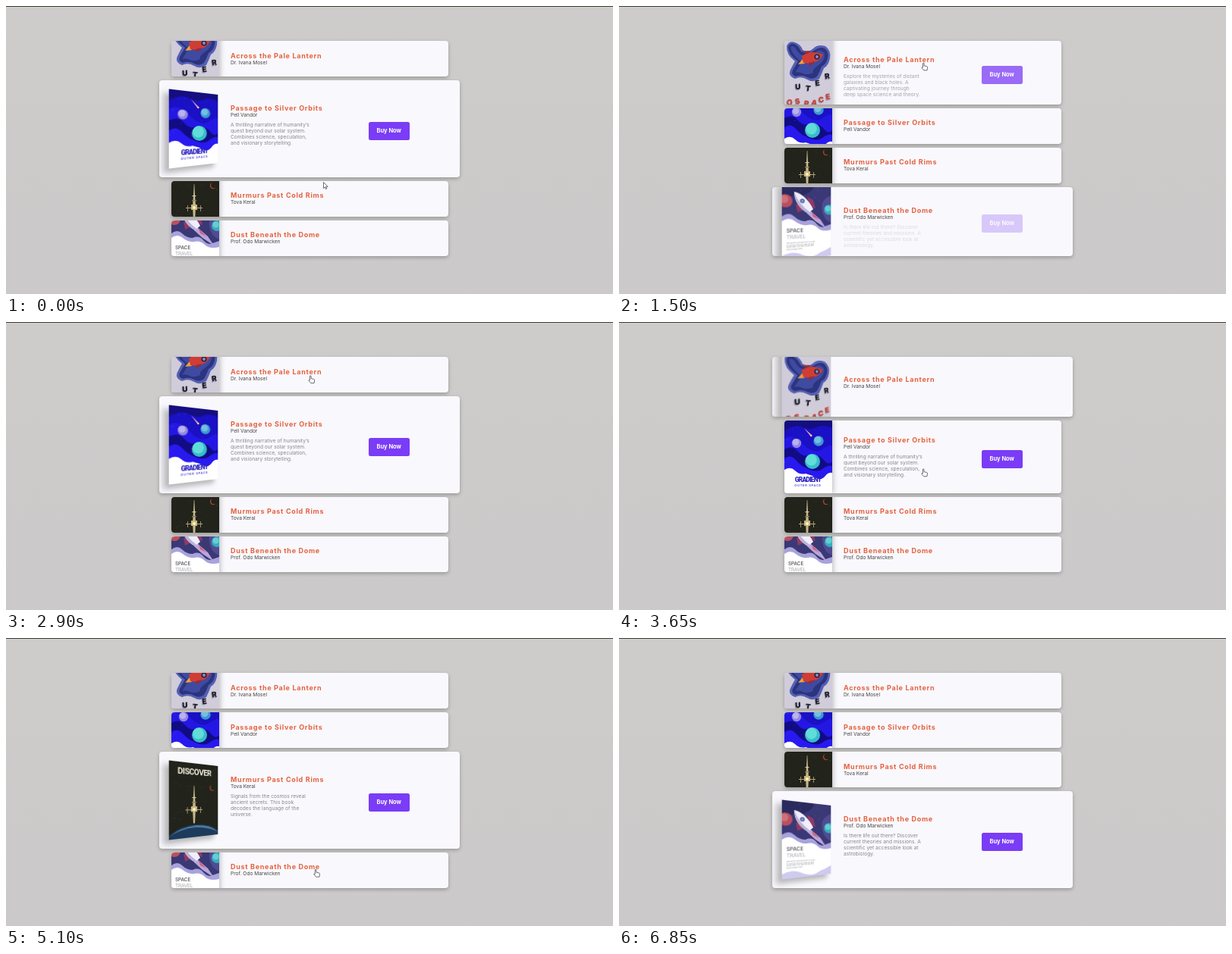
Write an HTML page that moves like this. It is 800 by 380 pixels and loops after 6.9 s.

```html
<!DOCTYPE html>
<html lang="en">
<head>
<meta charset="utf-8">
<title>Book accordion</title>
<style>
  html, body { margin: 0; width: 100%; height: 100%; overflow: hidden; }
  body { position: relative; background: linear-gradient(#cecccb, #cbc9c9); font-family: Inter, "Open Sans", sans-serif; }
  body::before { content: ""; position: absolute; inset: 0 0 auto; height: 1px; background: #3f3d30; }

  .card {
    --open: 0; --pop: 0; --tilt: 0; --sx: 1;
    position: absolute; overflow: hidden;
    left: calc(218px - 16px * var(--pop));
    width: calc(364.5px + 31.5px * var(--pop));
    border-radius: 4px; background: #f9f8fc;
    box-shadow: 0 2px 5px rgba(0, 0, 0, .25);
  }
  .body { position: absolute; top: 50%; left: calc(16px * var(--pop)); }
  .cover {
    position: absolute; left: 0; top: -48px; width: 63px; height: 96px;
    transform: perspective(120px) rotateY(calc(16deg * var(--tilt))) scale(var(--sx), calc(1 + .01 * var(--tilt)));
    box-shadow: calc(1px - 7px * var(--tilt)) calc(5px * var(--tilt)) 7px rgba(0, 0, 0, .27);
  }
  .cover svg { display: block; width: 63px; height: 96px; }
  .text {
    position: absolute; left: 78px; white-space: nowrap;
    top: calc(-4px - 18px * var(--open) - 5.5px * var(--pop));
  }
  .text > * { position: absolute; left: 0; margin: 0; }
  h2 { top: -6px; font: 700 9px/12px Inter, sans-serif; letter-spacing: .7px; color: #e4623f; }
  .author { top: 5px; font-size: 6.6px; line-height: 8px; color: #444; }
  .blurb { top: 18px; font-size: 6.6px; line-height: 8px; letter-spacing: .04px; color: #878589; white-space: pre; opacity: var(--open); }
  .buy {
    position: absolute; left: 260px; top: -9px; width: 53.5px; height: 24px;
    border-radius: 2.5px; background: #7a3cf6; color: #fff; opacity: var(--open);
    font-size: 7.5px; font-weight: 700; line-height: 24px; text-align: center; white-space: nowrap;
  }
  #cursor { position: absolute; left: 0; top: 0; width: 12px; height: 14px; overflow: visible; }
  #cursor path { fill: #fff; stroke: #333; stroke-width: .7; stroke-linejoin: round; }
</style>
</head>
<body>
<svg id="cursor" viewBox="0 0 12 14">
  <path id="arrow" d="M.5 .5V8.6L2.4 6.9 3.6 9.6 4.8 9 3.6 6.4H6.2Z"/>
  <path id="hand" d="M2.4 .8Q3.3 0 4 .9V4.2L7.5 5Q8.6 5.3 8.5 6.5L7.9 10.2H3.6L.8 6.8Q.7 5.6 2.4 6.4Z"/>
</svg>
<script>
const label = (x, y, size, fill, text, extra = "") =>
  `<text x="${x}" y="${y}" font-size="${size}" fill="${fill}" ${extra}>${text}</text>`;
const disc = (x, y, r, fill) => `<circle cx="${x}" cy="${y}" r="${r}" fill="${fill}"/>`;
const shape = (d, fill) => `<path d="${d}" fill="${fill}"/>`;
const rect = (x, y, w, h, fill) => `<rect x="${x}" y="${y}" width="${w}" height="${h}" fill="${fill}"/>`;

// Small repeatable scatter of dots
function dots(count, seed, height, fill) {
  let out = "";
  for (let i = 0; i < count; i++) {
    seed = (seed * 16807) % 2147483647;
    out += disc(seed % 63, (seed >> 8) % height, .3, fill);
  }
  return out;
}

// Letters as [glyph, x, baseline, turn]
const scattered = (list, fill) => list.map(([c, x, y, turn]) => {
  const style = `text-anchor="middle" font-weight="900" transform="rotate(${turn} ${x} ${y})"`;
  return label(x - 1, y + 1.2, 10, "#9a95a8", c, style) + label(x, y, 10, fill, c, style);
}).join("");

function papercutCover() {
  return rect(0, 0, 63, 96, "#d0ccd9") +
    shape("M3 13Q6 5 14 8T24 18Q32 22 38 16T54 13Q62 19 60 29T52 42Q49 50 46 56 38 62 30 57T14 56Q4 52 8 44T14 33Q2 24 3 13Z", "#5560b4") +
    shape("M5 14Q8 8 13 10T22 20Q31 25 39 19T53 16Q59 21 57 29T49 40Q46 48 43 53 37 58 30 54T15 53Q8 50 11 45T18 33Q5 24 5 14Z", "#2b347c") +
    shape("M8 14Q12 11 16 18T26 25Q38 24 42 20T53 22Q54 32 45 38T38 48Q30 52 24 49T14 48Q18 42 23 34 9 24 8 14Z", "#3f4aa2") +
    shape("M18 37L24 30 27 36Z", "#f0a03c") +
    shape("M23 26Q36 17 51 24 48 33 34 36L25 35Z", "#cf3d35") +
    shape("M29 23L23 20 36 19ZM32 35L32 40 41 33Z", "#972c36") +
    disc(43, 27, 3.6, "#23264a") + disc(43, 27, 1.9, "#8b93c8") +
    scattered([["U", 18, 70, -4], ["T", 31, 72, 6], ["E", 44, 65, -8], ["R", 57, 56, -10]], "#20202e") +
    scattered([["O", 7, 91, 0], ["S", 18, 89, -12], ["P", 29, 92, 5], ["A", 39, 91, 8], ["C", 49, 87, -8], ["E", 58, 83, -10]], "#c9473f");
}

function wavesCover() {
  return rect(0, 0, 63, 96, "#1a10c4") +
    shape("M0 0H63V10Q52 4 42 9T22 8Q10 5 0 15Z", "#150e80") +
    shape("M0 24Q8 18 16 24T30 36Q42 44 50 38T63 34V80H0Z", "#2417e4") +
    shape("M0 38Q10 32 17 40T30 46Q46 44 52 52T63 54V80H0Z", "#110c84") +
    shape("M0 50Q8 44 15 52T28 62Q42 70 50 64T63 60V86H0Z", "#2819f0") +
    dots(18, 71, 60, "#b6b4ff") +
    shape("M26 10L36 19 34.5 21Z", "#d59ac4") + disc(35.3, 20, 1.2, "#ffd86b") +
    disc(16, 30, 6.2, "#9288dc") + disc(15, 28.5, 4.2, "#b9b2ee") +
    disc(45, 27, 6.7, "#3f98d0") + disc(44, 25.5, 4.5, "#72bfe2") +
    disc(37, 54, 10, "#37bccb") + disc(35.5, 52, 7.4, "#62dcd8") +
    shape("M0 65Q8 60 14 66T28 70Q36 72 42 76T54 73Q58 68 63 69V96H0Z", "#fff") +
    label(31, 81.4, 8.4, "#2a20c4", "GRADIENT", 'text-anchor="middle" font-weight="800" letter-spacing="-.75" font-family="Roboto, sans-serif"') +
    label(31, 87, 4, "#2a20c4", "OUTER SPACE", 'text-anchor="middle" font-weight="500" letter-spacing=".7"');
}

function stationCover() {
  return rect(0, 0, 63, 96, "#22231b") + dots(34, 913, 74, "#8a886c") +
    label(31.5, 15.2, 10, "#f4f0dc", "DISCOVER", 'text-anchor="middle" font-weight="700" letter-spacing="-.5" font-family="Roboto, sans-serif"') +
    disc(55, 31, 4.2, "#a8452f") + disc(56.2, 30.2, 4, "#22231b") +
    shape("M-4 96Q8 80 32 80T68 96Z", "#1d3a5c") +
    shape("M0 92Q14 81.5 32 81T63 92Q48 84 32 83.5T0 92Z", "#4f7f9f") +
    shape("M29.7 29H30.3L31 44 32 58 31 78H29L28 58 29 44Z", "#c4b88c") +
    rect(27.5, 44, 5, 1.2, "#d8cc9c") + rect(27, 50, 6, 1.2, "#8a7b55") +
    rect(19, 60, 22, 1, "#b9a877") + rect(26, 56, 8, 7, "#c9b680") +
    rect(21, 57, .9, 8, "#a79c74") + rect(38, 57, .9, 8, "#a79c74") +
    disc(30, 60, 2, "#fff2c4");
}

function cloudsCover() {
  const lines = ["Far past the quiet blue there is a road", "of slow light that any small ship may", "follow home, one calm star at a time,", "until morning comes."];
  return rect(0, 0, 63, 96, "#fff") + rect(0, 0, 63, 62, "#3a3875") +
    shape("M0 0H40Q34 14 18 16T0 22Z", "#2b2a5f") + shape("M63 12Q48 18 50 32T63 50Z", "#504b93") +
    dots(16, 333, 40, "#d9d6ff") +
    disc(4, 23, 8, "#b9505f") + disc(2.5, 21, 4.8, "#d0707a") +
    disc(60, 32, 7, "#35aebb") + disc(58.5, 30.5, 4, "#66cdd2") +
    shape("M0 42Q8 36 14 42T28 48Q36 44 42 51T54 55L63 52V70H0Z", "#a8a2dc") +
    shape("M0 48Q8 42 15 48T30 53Q38 51 44 57T63 60V96H0Z", "#fff") +
    shape("M34 34L48 46 56 58 41 48 30 38Z", "#b9a6dc") + shape("M36 36L46 46 38 42Z", "#dc5a6a") +
    shape("M16 27L26 24 24 34 18 37ZM30 16L38 20 41 31 33 28Z", "#8f3a66") +
    shape("M14 11Q28 13 38 32L31 38Q14 28 14 11Z", "#f0eefa") +
    shape("M14 11Q15 28 31 38L33.5 36Q19 26 14 11Z", "#b8b2d8") +
    disc(24, 22, 2.8, "#4b4794") + disc(24, 22, 1.6, "#7fb3d8") +
    label(5, 62.5, 6.3, "#4a4a52", "SPACE", 'font-weight="500"') +
    label(5, 70.5, 6.3, "#8b8a92", "TRAVEL", 'font-weight="300"') +
    lines.map((s, i) => label(5, 76.5 + i * 2.4, 2, "#9d9ca6", s)).join("") +
    shape("M0 90Q12 84 24 91T48 90Q56 88 63 84V96H0Z", "#cfcaf0");
}

const books = [
  ["Across the Pale Lantern", "Dr. Ivana Mosel", papercutCover(),
    "Explore the mysteries of distant\ngalaxies and black holes. A\ncaptivating journey through\ndeep space science and theory."],
  ["Passage to Silver Orbits", "Pell Vandor", wavesCover(),
    "A thrilling narrative of humanity’s\nquest beyond our solar system.\nCombines science, speculation,\nand visionary storytelling."],
  ["Murmurs Past Cold Rims", "Tova Keral", stationCover(),
    "Signals from the cosmos reveal\nancient secrets. This book\ndecodes the language of the\nuniverse."],
  ["Dust Beneath the Dome", "Prof. Odo Marwicken", cloudsCover(),
    "Is there life out there? Discover\ncurrent theories and missions. A\nscientific yet accessible look at\nastrobiology."]
];

const cursor = document.getElementById("cursor");
const arrow = document.getElementById("arrow");
const hand = document.getElementById("hand");

const cards = books.map(([title, author, art, blurb]) => {
  const card = document.createElement("div");
  card.className = "card";
  card.innerHTML = `<div class="body">
    <div class="cover"><svg viewBox="0 0 63 96">${art}</svg></div>
    <div class="text"><h2>${title}</h2><div class="author">${author}</div><div class="blurb">${blurb}</div></div>
    <div class="buy">Buy Now</div></div>`;
  document.body.insertBefore(card, cursor);
  return card;
});

const LOOP = 6900;
// [time, card]
const picks = [[-1000, 1], [150, 2], [770, 3], [1400, 0], [2150, 1], [2900, 0], [3470, 1], [4420, 2], [5150, 3]];
// [time, x, y]
const path = [
  [0, 418, 232], [130, 412, 256], [480, 410, 256], [700, 403.5, 307], [1000, 403.5, 307],
  [1320, 400, 70], [1700, 396, 80], [2050, 391, 196], [2600, 392, 196], [2850, 398, 70],
  [3150, 400, 75], [3420, 398, 193.5], [3900, 398, 193.5], [4350, 398.5, 249.5], [4800, 399, 249.5],
  [5100, 405, 305], [5350, 412, 305], [5650, 462, 267], [5850, 500, 266], [6250, 500, 266], [6650, 515, -16]
];

const smooth = p => { p = Math.min(1, Math.max(0, p)); return p * p * (3 - 2 * p); };

function drawCards(t) {
  let n = picks.length - 1;
  while (picks[n][0] > t) n--;
  const [start, current] = picks[n];
  const previous = n ? picks[n - 1][1] : -1;
  const level = (i, delay, span) => {
    const k = smooth((t - start - delay) / span);
    return i === current ? k : i === previous ? 1 - k : 0;
  };
  let y = 46.25;
  cards.forEach((card, i) => {
    const open = level(i, 0, 150), pop = level(i, 200, 250), tilt = level(i, 200, 400);
    const height = 47 + 49 * open + 31.5 * pop;
    const style = card.style;
    style.setProperty("--open", open);
    style.setProperty("--pop", pop);
    style.setProperty("--tilt", tilt);
    style.setProperty("--sx", 1 + .06 * tilt + .08 * Math.sin(Math.PI * tilt));
    style.top = y + "px";
    style.height = height + "px";
    y += height + 5;
  });
}

function drawCursor(t) {
  let n = path.length - 1;
  while (path[n][0] > t) n--;
  const a = path[n], b = path[n + 1] || a;
  const k = b === a ? 0 : smooth((t - a[0]) / (b[0] - a[0]));
  cursor.style.transform = `translate(${a[1] + (b[1] - a[1]) * k}px, ${a[2] + (b[2] - a[2]) * k}px)`;
  const pointing = t > 60 && t < 6350;
  hand.style.display = pointing ? "" : "none";
  arrow.style.display = pointing ? "none" : "";
}

const began = performance.now();
function draw() {
  const t = Math.max(0, performance.now() - began) % LOOP;
  drawCards(t);
  drawCursor(t);
  requestAnimationFrame(draw);
}
draw();
</script>
</body>
</html>
```
